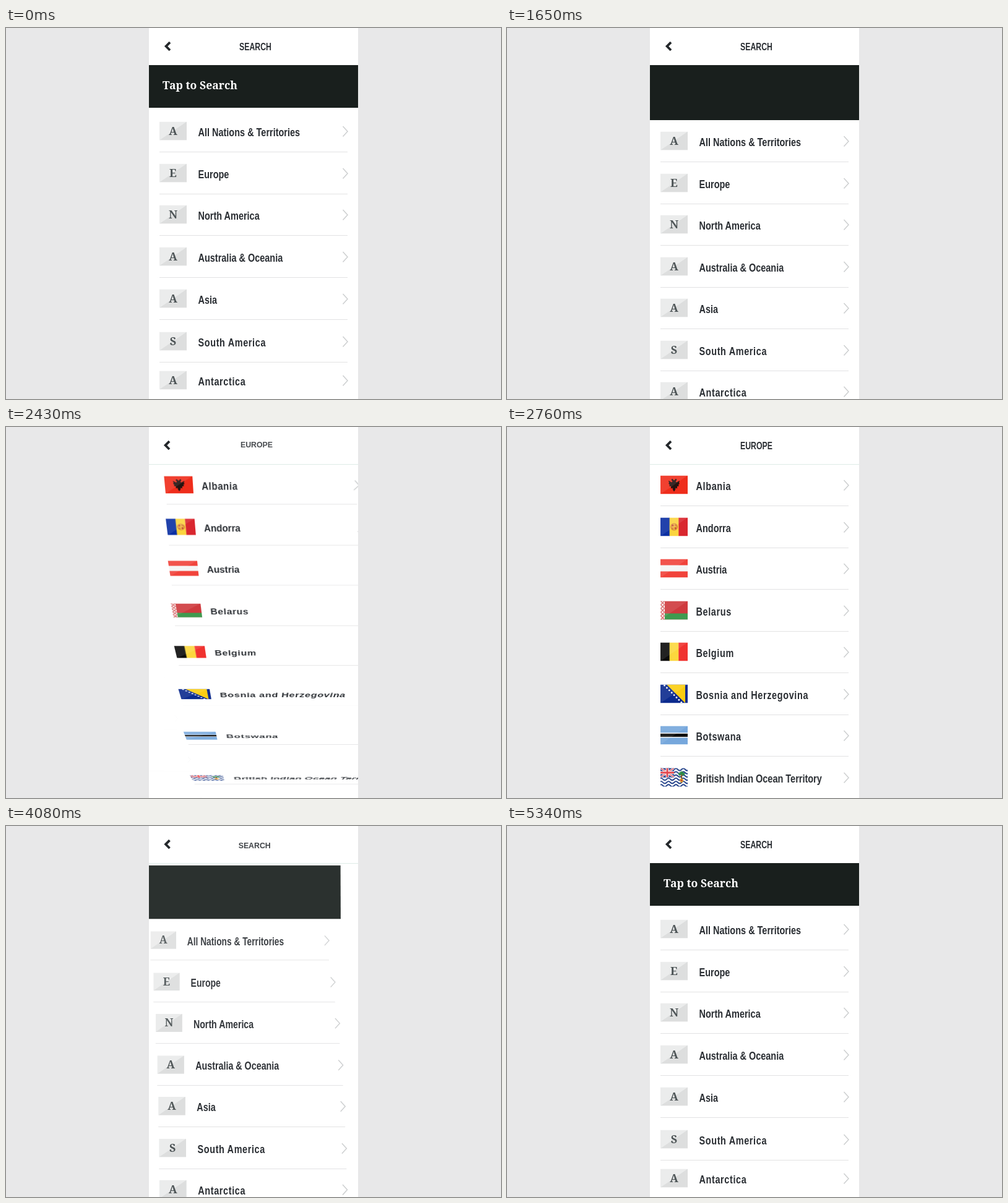
These frames come from a looping animation (800 by 600 pixels, 6120 ms). An HTML page:

```html
<!DOCTYPE html>
<html lang="en">
<head>
<meta charset="utf-8">
<title>Region list</title>
<style>
  html, body { margin: 0; width: 100%; height: 100%; overflow: hidden; background: #e8e8e9; }
  #phone { position: absolute; left: 231px; top: 0; width: 338px; height: 600px; overflow: hidden; background: #fff; }
  #phone > * { position: absolute; left: 0; top: 0; }
  .row { width: 338px; height: 68px; overflow: visible; }
  .region { transform-origin: -271px 72px; }
  .country { transform-origin: 169px 34px; }
  .sans { font: bold 19px "Liberation Sans", Arial, sans-serif; fill: #2a2e33; }
  .serif { font: bold 18px "Noto Serif", "Liberation Serif", serif; fill: #4d5456; text-anchor: middle; }
  #head { width: 338px; height: 60px; background: #fff; }
  #rule { top: 60px; width: 338px; height: 1px; background: #deebe7; }
  #band { width: 338px; height: 600px; background: #191f1d; }
  #hint { left: 22px; top: 80px; font: bold 17.6px/24px "Noto Serif", "Liberation Serif", serif; color: #fff; white-space: nowrap; }
  .title { font-size: 16px; text-anchor: middle; }
  .titleBox { transform-origin: 172px 30px; }
  #tap { width: 56px; height: 56px; margin: -28px; border-radius: 50%; background: rgba(245, 159, 255, .8); }
</style>
</head>
<body>
<div id="phone">
  <div id="rule"></div>
  <div id="band"></div>
  <div id="hint">Tap to Search</div>
  <svg id="head" viewBox="0 0 338 60">
    <path id="back" d="M34 23.2L27.6 29.6L34 36" fill="none" stroke="#24282b" stroke-width="3.8"/>
    <g class="titleBox" id="searchTitle"><text class="sans title" transform="translate(172 36) scale(.77 1)">SEARCH</text></g>
    <g class="titleBox" id="europeTitle"><text class="sans title" transform="translate(172 36) scale(.77 1)">EUROPE</text></g>
  </svg>
  <div id="tap"></div>
</div>
<script>
const LOOP = 6120, STEP = 67.55, DEPTH = 700;
const $ = id => document.getElementById(id);
const phone = $('phone');
const clamp = x => Math.min(1, Math.max(0, x));
const span = (t, start, length) => clamp((t - start) / length);
const easeOut = (x, n = 3) => 1 - (1 - x) ** n;

const rect = (x, y, w, h, fill) => `<rect x="${x}" y="${y}" width="${w}" height="${h}" fill="${fill}"/>`;
const shape = (d, fill) => `<path d="${d}" fill="${fill}"/>`;
const line = (d, color, width) => `<path d="${d}" fill="none" stroke="${color}" stroke-width="${width}"/>`;
const dot = (x, y, r, fill) => `<circle cx="${x}" cy="${y}" r="${r}" fill="${fill}"/>`;
const repeat = (n, make) => Array.from({ length: n }, (_, i) => make(i)).join('');
const columns = (...colors) => colors.map((c, i) => rect(i * 44 / 3, 0, 15, 30, c)).join('');

const gloss = '<path d="M0 30V0H44Z" fill="#fff" opacity=".09"/>';

const eagle = 'M22 8L19 5L17.5 7L19.5 9.5L18 11L13 8L14 12L13 13L15 15L14 17L17 17.5' +
  'L17 21L19.5 20L20 23L22 26L24 23L24.5 20L27 21L27 17.5L30 17L29 15L31 13L30 12' +
  'L31 8L26 11L24.5 9.5L26.5 7L25 5Z';

function unionCanton() {
  const diagonals = 'M0 0L22 15M22 0L0 15', cross = 'M11 0V15M0 7.5H22';
  return rect(0, 0, 22, 15, '#16307f') +
    `<svg width="22" height="15">${line(diagonals, '#fff', 3) + line(diagonals, '#e0343b', 1.2) +
      line(cross, '#fff', 5) + line(cross, '#e0343b', 2.8)}</svg>`;
}

const flags = {
  albania: rect(0, 0, 44, 30, '#ef2d1b') + shape(eagle, '#251310'),
  andorra: columns('#0b2fa3', '#fbd440', '#d9272f') + dot(22, 15, 6, '#d98a3c') +
    line('M18 15H26M22 10V20', '#f6c64a', 1.6) + dot(20, 13, 1.3, '#c2443a') + dot(24, 17, 1.3, '#c2443a'),
  austria: rect(0, 0, 44, 30, '#f5f5f5') + rect(0, 0, 44, 10, '#f1433b') + rect(0, 20, 44, 10, '#f1433b'),
  belarus: rect(0, 0, 44, 30, '#cf3a3e') + rect(0, 20, 44, 10, '#3f9a4f') + rect(0, 0, 7, 30, '#f7ecea') +
    repeat(5, i => line(`M.5 ${i * 6}L3.5 ${i * 6 + 3}L6.5 ${i * 6}M.5 ${i * 6 + 6}L3.5 ${i * 6 + 3}L6.5 ${i * 6 + 6}`, '#d5565a', 1.1)),
  belgium: columns('#0c0c0c', '#fcd73d', '#f0322f'),
  bosnia: rect(0, 0, 44, 30, '#0c2b8e') + shape('M10 0H40V30Z', '#fbcd12') +
    repeat(8, i => dot(6.5 + i * 3.9, 1.5 + i * 3.9, 1.4, '#fff')),
  botswana: rect(0, 0, 44, 30, '#76a7dc') + rect(0, 11, 44, 8, '#fff') + rect(0, 12.4, 44, 5.2, '#0d0d0d'),
  ocean: rect(0, 0, 44, 30, '#fafafa') +
    repeat(6, i => line(`M-2 ${2.5 + i * 5.2}q3 -3.4 6 0${'t6 0'.repeat(7)}`, '#1a3a86', 1.9)) + unionCanton() +
    line('M34 9V24', '#8a5a2b', 2) + shape('M34 5L40 9L37 13L34 10L31 13L28 9Z', '#2f8b4a') +
    dot(34, 20, 3, '#e0a938') + dot(34, 20, 1.4, '#c23b34')
};

const letterTile = c => rect(0, 0, 44, 30, '#ebecec') + shape('M0 30L44 0V30Z', '#dddede') +
  `<text class="serif" x="22" y="21.3">${c}</text>`;

function addRow(kind, icon, label, textX, loose) {
  const holder = document.createElement('div');
  holder.className = 'row ' + kind;
  holder.innerHTML = `<svg class="row" viewBox="0 0 338 68">
    <svg x="17" y="17.5" width="44" height="30">${icon}</svg>
    <text class="sans" transform="translate(${textX} 41) scale(.763 1)" letter-spacing="${loose ? .8 : 0}">${label}</text>
    ${line('M313.5 25L321 33.3L313.5 41.6', '#cdcfd0', 1.5)}
    ${line('M17 66.5H321', '#e2e2e3', 1)}</svg>`;
  phone.insertBefore(holder, $('rule'));
  return holder;
}

// label, resting lift above the opened position, loose tracking
const regions = [
  ['All Nations &amp; Territories', 16], ['Europe', 16], ['North America', 16], ['Australia &amp; Oceania', 16],
  ['Asia', 15.2], ['South America', 14.2, true], ['Antarctica', 18.2, true]
].map(([label, lift, loose]) => ({ lift, el: addRow('region', letterTile(label[0]), label, 79.5, loose) }));

const countries = [
  ['albania', 'Albania', true], ['andorra', 'Andorra'], ['austria', 'Austria'], ['belarus', 'Belarus', true],
  ['belgium', 'Belgium', true], ['bosnia', 'Bosnia and Herzegovina', true], ['botswana', 'Botswana', true],
  ['ocean', 'British Indian Ocean Territory']
].map(([flag, label, loose]) => addRow('country', flags[flag] + gloss, label, 74.5, loose));

// time, x, y
const taps = [[870, 169, 93], [1950, 174, 250], [3540, 29, 32], [4830, 29, 28]];

function drawRegions(t, open) {
  regions.forEach(({ el, lift }, k) => {
    const away = t < 3000 ? span(t, 1948 + 28 * k, 400) : (1 - span(t, 3640 + 29 * (6 - k), 500)) ** 3;
    el.style.top = 150 + STEP * k - lift * (1 - open) + 'px';
    el.style.transform = away ? `scale(${1 - away / 2})` : 'none';
    el.style.opacity = 1 - away;
  });
}

function drawCountries(t) {
  countries.forEach((el, k) => {
    let turn, away;
    if (t < 3000) {
      turn = 1 - span(t, 2165 + 22 * k, 480);
      away = turn ** 3;
    } else {
      turn = span(t, 3555 + 22 * (7 - k), 320);
      away = easeOut(turn);
    }
    const tilt = clamp((turn - .29) * 1.75);
    el.style.top = 61 + STEP * k + 'px';
    el.style.opacity = tilt === 1 ? 0 : clamp(1.45 * (1 - away) + .03);
    el.style.transform = away
      ? `perspective(${DEPTH}px) translate3d(${150 * away}px, 0, ${.353 * away * DEPTH}px) rotateX(${-90 * tilt}deg)`
      : 'none';
  });
}

function drawBand(t, open) {
  const p = t < 3000 ? span(t, 1950, 270) : (1 - span(t, 3843, 420)) ** 3;
  const top = 60 + 47 * p, bottom = 129 + 20 * open + 15 * p;
  const band = $('band').style;
  band.clipPath = `polygon(0 ${top}px, ${338 - 349 * p}px ${top}px, ${338 - 345 * p}px ${bottom}px, 0 ${bottom}px)`;
  band.opacity = 1 - p;
  $('hint').style.opacity = t < 3000 ? 1 - span(t, 870, 230) : span(t, 4980, 300);
}

function flipTitle(id, p, side) {
  const style = $(id).style;
  style.transform = `translate(${side * 9 * p}px, ${-side * 8 * p}px) scaleY(${1 - p})`;
  style.opacity = p === 1 ? 0 : 1 - .7 * p;
}

function drawHead(t) {
  const back = t > 3000;
  flipTitle('searchTitle', back ? 1 - easeOut(span(t, 3930, 320)) : span(t, 1990, 210), -1);
  flipTitle('europeTitle', back ? span(t, 3820, 180) : 1 - easeOut(span(t, 2250, 450)), 1);
  const nudge = Math.sin(Math.PI * span(t, 1950, 600)) + Math.sin(Math.PI * span(t, 3540, 600));
  $('back').style.transform = `translateX(${-1.7 * nudge}px)`;
}

function drawTap(t) {
  const tap = taps.find(([at]) => t >= at && t < at + 265);
  const style = $('tap').style;
  style.opacity = tap ? 1 - span(t, tap[0] + 215, 50) : 0;
  if (tap) style.transform = `translate(${tap[1]}px, ${tap[2]}px) scale(${easeOut(span(t, tap[0], 110))})`;
}

function draw(t) {
  const open = t < 3000 ? easeOut(span(t, 870, 780), 2.25) : 1 - easeOut(span(t, 4830, 520), 2.25);
  drawRegions(t, open);
  drawCountries(t);
  drawBand(t, open);
  drawHead(t);
  drawTap(t);
}

const begin = performance.now();
function tick() {
  draw((performance.now() - begin) % LOOP);
  requestAnimationFrame(tick);
}
tick();
</script>
</body>
</html>
```
